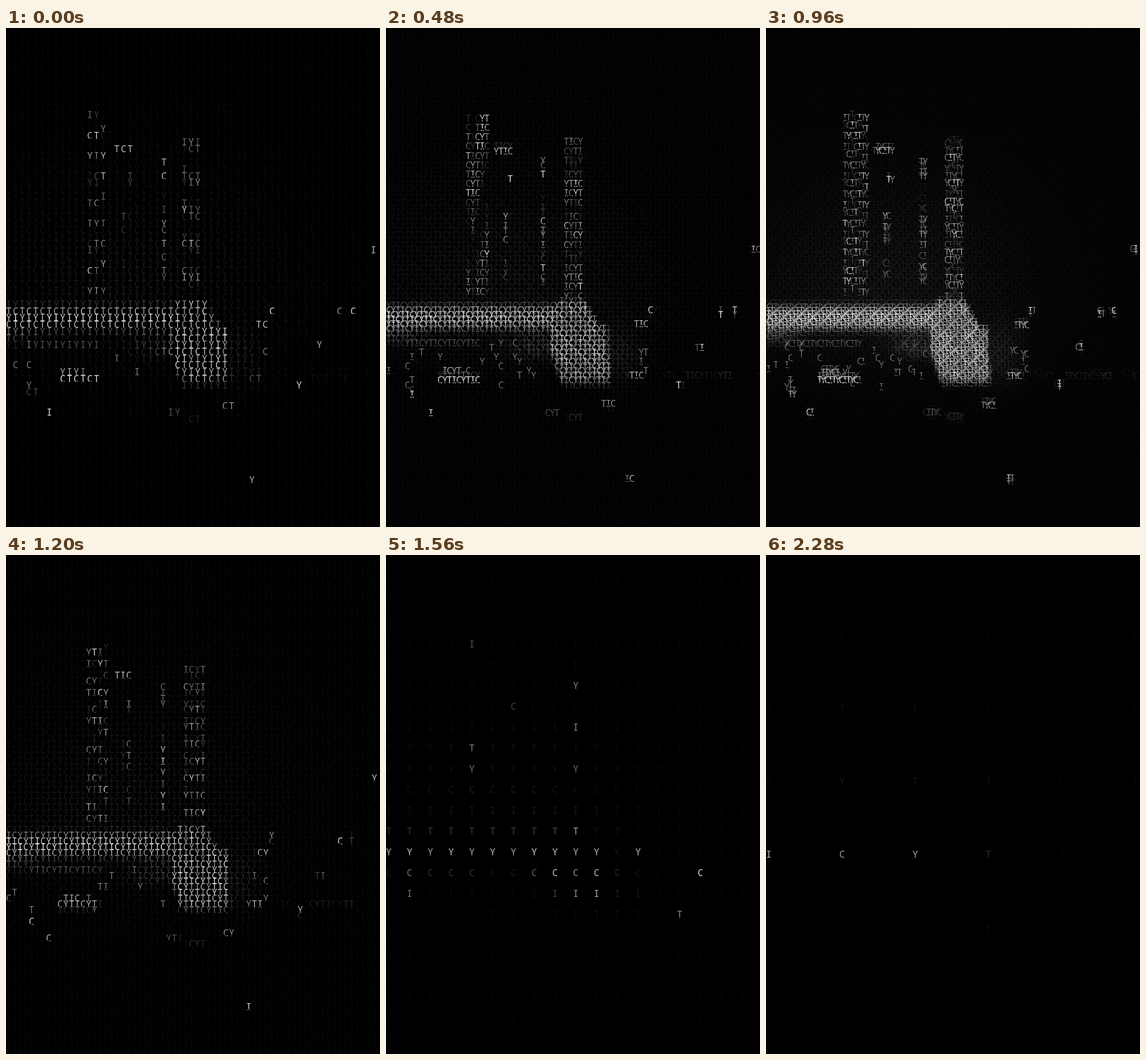
An HTML page with a canvas that plays this animation: 648x864 px, repeating every 2400 ms.

```html
<!DOCTYPE html>
<html lang="en">
<head>
<meta charset="utf-8">
<title>City in letters</title>
<style>
  html, body { margin: 0; width: 100%; height: 100%; overflow: hidden; background: #000; }
  canvas { display: block; width: 648px; height: 864px; }
</style>
</head>
<body>
<canvas id="stage" width="648" height="864"></canvas>
<script>
const W = 648, H = 864, TICK = 120, TICKS = 20, SCALE = 0.9;
const WORD = 'CITY';
const ctx = document.getElementById('stage').getContext('2d');

const clamp = (v, lo = 0, hi = 1) => Math.min(hi, Math.max(lo, v));
const bell = (d, s) => Math.exp(-d * d / (2 * s * s));
const blob = (x, y, cx, cy, sx, sy) => bell(x - cx, sx) * bell(y - cy, sy);
const spot = (dx, dy) => clamp(1.5 - Math.hypot(dx, dy) / 5);
const line = (x, y, from, to, cy) => spot(x - clamp(x, from, to), y - cy);

// Distance from the nearest of evenly spaced levels.
function gap(y, first, period) {
  const k = Math.round((y - first) / period);
  return Math.abs(y - first - k * period);
}

function noise(x, y, size = 7) {
  const n = Math.sin(Math.floor(x / size) * 127.1 + Math.floor(y / size) * 311.7) * 43758.5453;
  return n - Math.floor(n);
}

// The grid tightens, faster at first, then eases wide open.
function pitchAt(tick) {
  if (tick <= 8) return 7 + (8 - tick) / 2 + Math.max(0, 4 - tick) / 2;
  return Math.ceil(7 + 88.6 * (1 - Math.cos(0.203 * (tick - 8.65))));
}

function leftTower(x, y) {
  if (x < 135 || x > 176 || y < 149 || y > 463) return 0;
  const bend = Math.abs(x - 150) * 0.18;
  const d = gap(y, 152 + bend, 16.75);
  return 8 + 220 * clamp(1.5 - d / 2.3) * (0.35 + 0.65 * noise(x, y));
}

function rightTower(x, y) {
  if (x < 309 || x > 343 || y < 190 || y > 466) return 0;
  const d = gap(y, 240 + Math.abs(x - 326) * 0.1, 14.7);
  const edge = y < 222 ? 0.6 : 1;
  return 12 + 215 * edge * clamp(1.5 - d / 2.6) * (0.35 + 0.65 * noise(x, y));
}

function hall(x, y) {
  const top = 467 + Math.max(0, 300 - x);
  const left = 284 + Math.max(0, y - 560) * 0.35;
  const right = y < 515 ? 342 + (y - 467) * 0.55 : 384 + (y - 515) * 0.06;
  const inside = clamp((x - left) / 8 + 0.5) * clamp((right - x) / 8 + 0.5)
    * clamp((y - top) / 10) * clamp((624 - y) / 18);
  return inside * (130 + 90 * noise(x, y, 9));
}

function beam(x, y) {
  if (x > 292) return 0;
  const d = y - 503;
  return (160 * Math.exp(-((d / 22) ** 4)) + 45 * bell(d, 8)) * (0.85 + 0.25 * noise(x, y));
}

// Two columns of windows between the towers.
function windows(x, y) {
  const column = (cx, from, to) => y < from - 5 || y > to + 5 ? 0
    : spot(x - cx, gap(y, from, 20.3)) * noise(cx, Math.round((y - from) / 20.3), 1);
  return 230 * Math.max(column(209, 326, 428), column(273, 233, 456));
}

// Sparse lamps along both banks.
function banks(x, y) {
  if (y < 540 || y > 622 || (x > 295 && x < 425) || x > 460) return 0;
  return noise(x, y) > 0.92 ? 120 : 0;
}

const LAMPS = [
  [215, 262], [460, 490], [580, 494], [603, 491], [545, 552],
  [509, 618], [46, 632], [77, 666], [423, 781], [640, 384]
];

function lines(x, y) {
  return Math.max(
    225 * line(x, y, 95, 158, 608),
    170 * line(x, y, 101, 124, 595),
    190 * line(x, y, 193, 216, 211),
    85 * line(x, y, 40, 160, 546),
    190 * line(x, y, 437, 450, 514),
    180 * line(x, y, 424, 440, 602),
    50 * line(x, y, 440, 640, 602) * noise(x, y, 20),
    150 * line(x, y, 380, 394, 652),
    80 * line(x, y, 281, 297, 666),
    50 * line(x, y, 318, 338, 673)
  );
}

function light(x, y) {
  const glow = 6 + 20 * blob(x, y, 210, 475, 155, y < 475 ? 140 : 75)
    + beam(x, y)
    + 65 * blob(x, y, 15, 532, 28, 11)
    + 60 * blob(x, y, 258, 550, 28, 15) * (0.4 + noise(x, y))
    + 28 * blob(x, y, 405, 565, 26, 35);
  const lamp = Math.max(...LAMPS.map(([cx, cy]) => spot(x - cx, y - cy)));
  const v = Math.max(glow, hall(x, y), leftTower(x, y), rightTower(x, y),
    windows(x, y), banks(x, y), lines(x, y), 225 * lamp);
  return Math.round(clamp(v, 0, 238));
}

function draw(tick) {
  const pitch = pitchAt(tick), step = pitch * SCALE;
  const rows = Math.ceil(957 / pitch);
  ctx.fillStyle = '#000';
  ctx.fillRect(0, 0, W, H);
  ctx.font = '16px "Noto Sans Mono", "DejaVu Sans Mono", monospace';
  for (let i = 0; i * step < W; i++) {
    for (let j = 0; j < rows; j++) {
      const x = i * step, y = j * step;
      const v = light(x + 5, y + 10.5);
      ctx.fillStyle = `rgb(${v},${v},${v})`;
      ctx.fillText(WORD[(i * rows + j + 1) % 4], x, y + 16);
    }
  }
}

const start = performance.now();
let shown = -1;
function play() {
  const tick = Math.floor((performance.now() - start) / TICK) % TICKS;
  if (tick !== shown) draw(shown = tick);
  requestAnimationFrame(play);
}
play();
</script>
</body>
</html>
```
